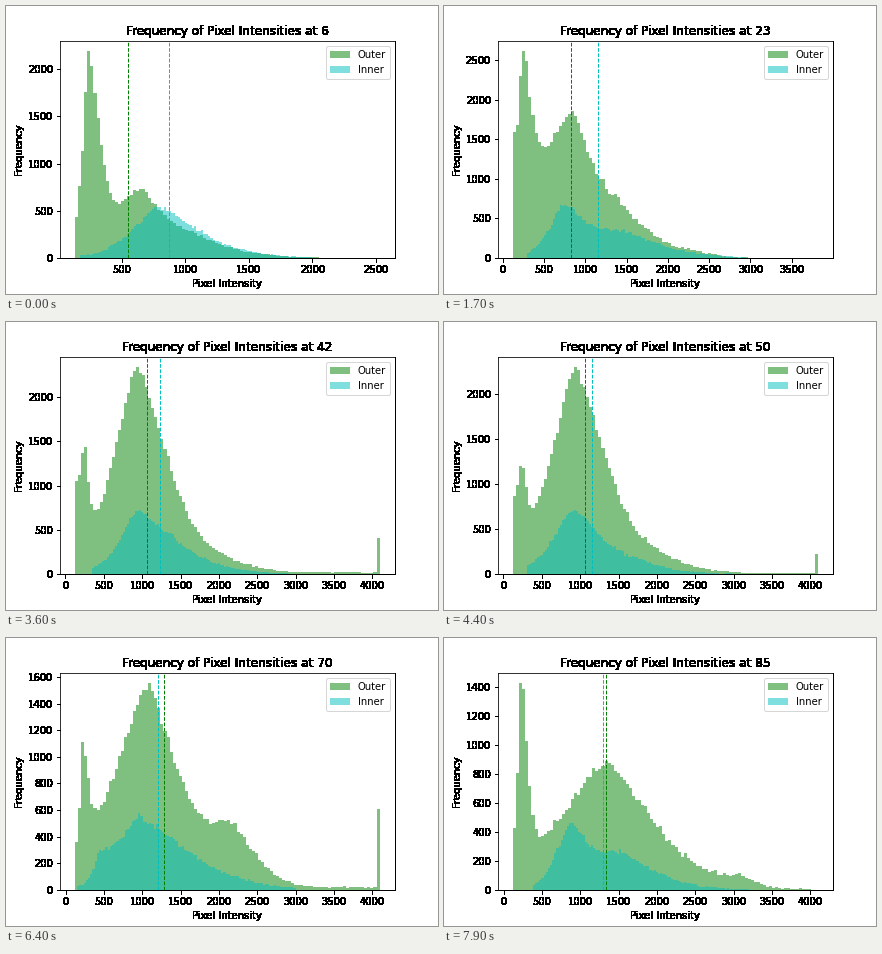
Recreate the animation shown at these times as a matplotlib script. Size 432 by 288 pixels, loop 8 s.

```python
from itertools import pairwise

import matplotlib.pyplot as plt
import numpy as np
from matplotlib.animation import FuncAnimation

FIRST, FRAMES, INTERVAL = 6, 80, 100
BINS = 100

plt.rcParams.update({
    "font.family": "DejaVu Sans", "font.size": 10, "figure.dpi": 72,
    "figure.subplot.left": 0.125, "figure.subplot.right": 0.9,
    "figure.subplot.bottom": 0.125, "figure.subplot.top": 0.88,
})


def humps(*parts):
    """Sum of lopsided bells, each (height, centre, left width, right width)."""
    def curve(x):
        total = np.zeros_like(x)
        for height, centre, left, right in parts:
            z = np.abs(x - centre) / np.where(x < centre, left, right)
            total += height * np.exp(-z ** 1.5)
        return total
    return curve


class Level:
    """Both distributions at one depth."""

    def __init__(self, number, peak, means, outer, inner_peak, inner_span,
                 inner, span=(126, 4095), piled=(0, 0)):
        self.number = number
        self.outer, self.inner = humps(*outer), humps(*inner)
        self.peak, self.inner_peak = peak, inner_peak
        self.means, self.span, self.inner_span, self.piled = map(
            np.array, (means, span, inner_span, piled))


# The outer bells are the dark spike, the main hump and the bright tail.
levels = [
    Level(6, 2194, (550, 874),
          [(2035, 238, 64, 115), (725, 650, 313, 240), (200, 1050, 250, 420)],
          545, (170, 2000), [(543, 780, 285, 450)], span=(131, 2530)),
    Level(15, 3045, (719, 1021),
          [(2300, 246, 80, 140), (1070, 760, 1000, 640),
           (55, 2300, 300, 350)],
          700, (250, 2900), [(665, 700, 250, 340), (270, 1350, 400, 520)],
          span=(126, 3536)),
    Level(31, 2197, (942, 1281),
          [(1000, 265, 120, 88), (1990, 850, 556, 285),
           (740, 1400, 450, 560)],
          650, (330, 3000), [(560, 780, 230, 325), (370, 1500, 550, 720)],
          piled=(770, 0)),
    Level(42, 2340, (1060, 1238),
          [(1080, 255, 180, 75), (2320, 935, 450, 560), (90, 2100, 400, 600),
           (20, 3800, 900, 900)],
          720, (350, 3000), [(710, 930, 320, 710)],
          span=(127.5, 4095), piled=(130, 390)),
    Level(59, 2250, (1078, 1052),
          [(600, 240, 130, 65), (2240, 945, 505, 550), (170, 1950, 350, 560)],
          710, (250, 3000), [(690, 880, 400, 390), (95, 1750, 350, 500)]),
    Level(70, 1555, (1290, 1212),
          [(790, 232, 50, 92), (1530, 1080, 660, 540), (430, 2150, 450, 470),
           (20, 3800, 900, 900)],
          575, (150, 3000), [(560, 950, 380, 890), (190, 440, 90, 230)],
          piled=(0, 595)),
    Level(85, 1428, (1335, 1303),
          [(1260, 238, 62, 98), (820, 1340, 900, 850), (55, 3050, 250, 300)],
          465, (380, 3200), [(425, 870, 260, 325), (240, 1500, 400, 650)]),
]


def mix(a, b, t):
    return a + (b - a) * t


def around(number):
    """Neighbouring levels and the fraction of the way between them."""
    for a, b in pairwise(levels):
        if number <= b.number:
            break
    return a, b, (number - a.number) / (b.number - a.number)


def histogram(a, b, t, span, peak, rng):
    """Counts with sampling noise, scaled to the given peak, and bin edges."""
    edges = np.linspace(*span, BINS + 1)
    mid = (edges[:-1] + edges[1:]) / 2
    h = mix(a(mid), b(mid), t)
    h = np.maximum(h + rng.normal(0, 0.6, BINS) * np.sqrt(h), 0)
    return h * peak / h.max(), edges


def solid(image, dpi):
    """Turn every touched pixel opaque black."""
    image[..., :3] = 0
    image[..., 3] = image[..., 3] > 0
    return image, 0, 0


fig, ax = plt.subplots(figsize=(6, 4), dpi=72, facecolor="white")
start = np.linspace(0, 1, BINS + 1)
outer_bars, inner_bars = (
    ax.stairs(np.ones(BINS), start, fill=True, color=color, alpha=0.5,
              label=label)
    for color, label in (("g", "Outer"), ("c", "Inner")))
mean_lines = [ax.axvline(0, color=color, linestyle="dashed", linewidth=1)
              for color in "gc"]
ax.set_xlabel("Pixel Intensity")
ax.set_ylabel("Frequency")
ax.legend(loc="upper right")
title = ax.set_title("")
for part in (title, ax.xaxis, ax.yaxis):
    part.set_agg_filter(solid)
ax.spines[["bottom", "right"]].set_linewidth(1)


def draw(i):
    number = FIRST + i
    a, b, t = around(number)
    rng = np.random.default_rng(number)

    span = mix(a.span, b.span, t)
    h, edges = histogram(a.outer, b.outer, t, span,
                         mix(a.peak, b.peak, t), rng)
    h[[0, -1]] += mix(a.piled, b.piled, t)
    outer_bars.set_data(h, edges)
    inner_bars.set_data(*histogram(
        a.inner, b.inner, t, mix(a.inner_span, b.inner_span, t),
        mix(a.inner_peak, b.inner_peak, t), rng))

    for line, x in zip(mean_lines, mix(a.means, b.means, t)):
        line.set_xdata([x, x])

    pad = 0.05 * (span[1] - span[0])
    ax.set_xlim(span[0] - pad, span[1] + pad)
    ax.set_ylim(0, h.max() * 1.05)
    title.set_text(f"Frequency of Pixel Intensities at {number}")
    return []


anim = FuncAnimation(fig, draw, frames=FRAMES, interval=INTERVAL,
                     init_func=lambda: [], repeat=True, repeat_delay=0)
plt.show()
```
